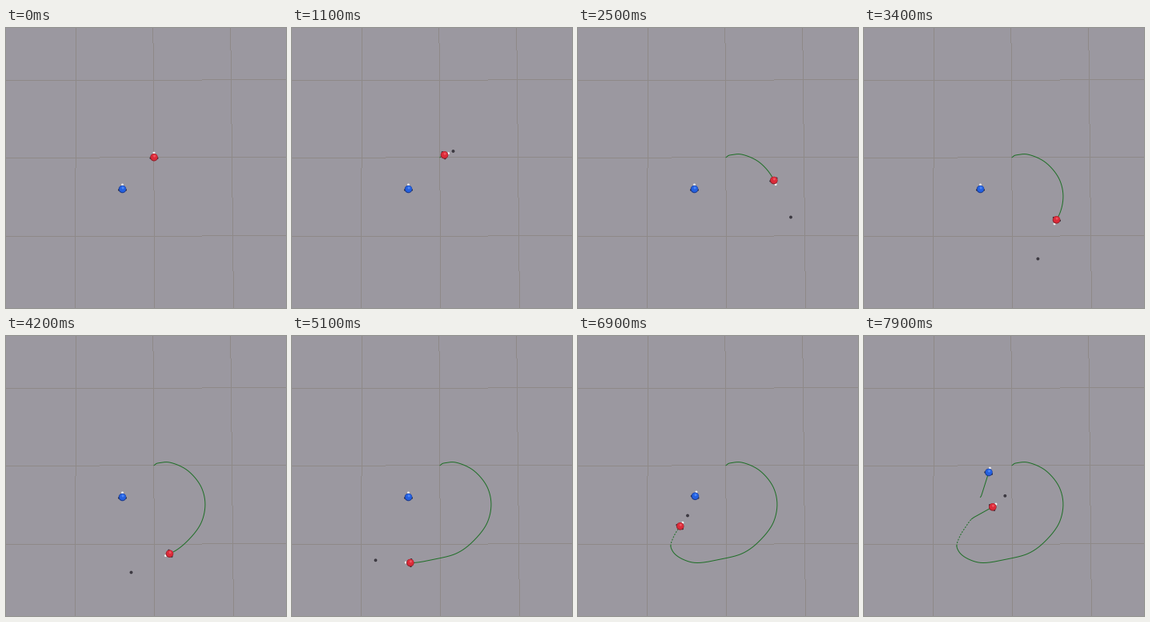
Write a matplotlib script that moves like this. It is 350 px wide and 350 px high and loops after 8 s.

```python
import numpy as np
import matplotlib.pyplot as plt
from matplotlib.animation import FuncAnimation
from matplotlib.patches import Circle

SIZE, FRAMES, STEP_MS = 350, 80, 100
PX = 0.72  # points per pixel at 100 dpi
FLOOR, GRID = (155, 152, 160), (142, 137, 136)
TRAIL = "#1f6f27"

# Waypoints: frame, x, y
CHASER = np.array([
    (6, 184.5, 161.2), (11, 190, 158.3), (15, 204, 157.5), (20, 227, 168),
    (25, 244.3, 190), (29, 248.4, 211.5), (33, 243, 234), (37, 228, 254),
    (42, 204, 271.7), (46, 178, 278.5), (51, 147.3, 283), (55, 131, 278.8),
    (60, 117.5, 268), (62, 115.4, 262), (65, 119, 250.5), (69, 127.2, 237.3),
    (72, 134, 228.3), (75, 144.5, 222), (78, 156.5, 215.3), (79, 160.3, 213.3)])
GOAL = np.array([
    (6, 184.5, 157.5), (11, 201, 153.5), (15, 230, 162), (19.5, 256, 189),
    (24, 266.5, 228), (25, 265.5, 236), (29, 251, 265), (33, 224, 285),
    (37.5, 191, 293.5), (42, 156, 295), (46.5, 126, 291), (51, 104, 279.8),
    (55, 100.5, 265), (60, 109, 249), (69, 136.5, 224), (78, 172, 201),
    (79, 175.8, 199.3)])
RUNNER = np.array([
    (67, 145, 201), (69, 145.9, 199.8), (73, 149.3, 189), (78, 154.4, 173),
    (79, 155.4, 170)])


def follow(path, t):
    """Smooth position on a waypoint path at time t (in frames)."""
    keys = path[:, 0]
    t = np.clip(np.atleast_1d(np.asarray(t, float)), keys[0], keys[-1])
    i = np.clip(np.searchsorted(keys, t, side="right") - 1, 0, len(keys) - 2)
    h = (keys[i + 1] - keys[i])[:, None]
    u = (t - keys[i])[:, None] / h
    pos = path[:, 1:]
    slope = np.gradient(pos, keys, axis=0)
    return ((1 + 2 * u) * (1 - u) ** 2 * pos[i] + u * (1 - u) ** 2 * h * slope[i]
            + u ** 2 * (3 - 2 * u) * pos[i + 1] + u ** 2 * (u - 1) * h * slope[i + 1])


def floor_image():
    img = np.empty((SIZE, SIZE, 3), np.uint8)
    img[:] = FLOOR
    span = np.arange(SIZE)
    for a, b in ((65.2, 64.2), (161.8, 160.9), (260.2, 259.2)):
        img[np.rint(np.linspace(a, b, SIZE)).astype(int), span] = GRID
    for a, b in ((87.3, 85.7), (183.4, 185.3), (280.2, 284)):
        img[span, np.rint(np.linspace(a, b, SIZE)).astype(int)] = GRID
    return img


fig = plt.figure(figsize=(SIZE / 100, SIZE / 100), dpi=100)
ax = fig.add_axes([0, 0, 1, 1])
ax.axis("off")
ax.imshow(floor_image(), interpolation="nearest", aspect="auto")
ax.set_xlim(-0.5, SIZE - 0.5)
ax.set_ylim(SIZE - 0.5, -0.5)


class Robot:
    """A shaded ball with dark wheels and a white nose."""

    def __init__(self, edge, body, shine):
        # radius, colour, forward offset, sideways offset
        turning = ((1.5, "#f4f4f4", 5.5, 0), (1.2, "#2a2630", -1, 4.3),
                   (1.2, "#2a2630", -1, -4.3))
        # radius, colour, fixed offset
        fixed = ((4.8, edge, 0, 0), (4.1, body, 0.2, -0.4), (1.5, shine, 0.6, -1.6))
        self.turning = [(self.disc(r, c), f, s) for r, c, f, s in turning]
        self.fixed = [(self.disc(r, c), x, y) for r, c, x, y in fixed]

    @staticmethod
    def disc(radius, color):
        return ax.add_patch(Circle((0, 0), radius, fc=color, lw=0, zorder=4))

    def place(self, pos, angle):
        x, y = pos
        c, s = np.cos(angle), np.sin(angle)
        for disc, fwd, side in self.turning:
            disc.center = x + fwd * c - side * s, y + fwd * s + side * c
        for disc, dx, dy in self.fixed:
            disc.center = x + dx, y + dy


def trail(path, start, end, style="-"):
    line, = ax.plot([], [], linestyle=style, color=TRAIL, lw=PX, zorder=2)
    return line, path, start, end


trails = [trail(CHASER, 6, 62), trail(CHASER, 62, 72, (0, (2, 1.6))),
          trail(CHASER, 72, 79), trail(RUNNER, 67, 79)]
goal = [ax.add_patch(Circle((0, 0), r, fc=c, lw=0, zorder=3))
        for r, c in ((1.9, "#35323a"), (0.6, "#55525a"))]
red = Robot("#93222d", "#dc2b39", "#ee5560")
blue = Robot("#1c3a8c", "#2460e0", "#4b86f5")


def draw(k):
    for line, path, start, end in trails:
        stop = min(k, end)
        pts = follow(path, np.linspace(start, stop, 240)) if stop > start else np.empty((0, 2))
        line.set_data(pts[:, 0], pts[:, 1])

    chaser, target = follow(CHASER, k)[0], follow(GOAL, k)[0]
    dx, dy = target - chaser
    red.place(chaser, np.arctan2(dy, dx))
    for disc in goal:
        disc.center = tuple(target)
        disc.set_visible(k > 6)

    turn = 0.27 * np.clip((k - 67) / 2, 0, 1)
    blue.place(follow(RUNNER, k)[0], turn - np.pi / 2)
    return []


anim = FuncAnimation(fig, draw, frames=FRAMES, interval=STEP_MS,
                     init_func=lambda: draw(0), repeat=True, repeat_delay=0)
plt.show()
```
